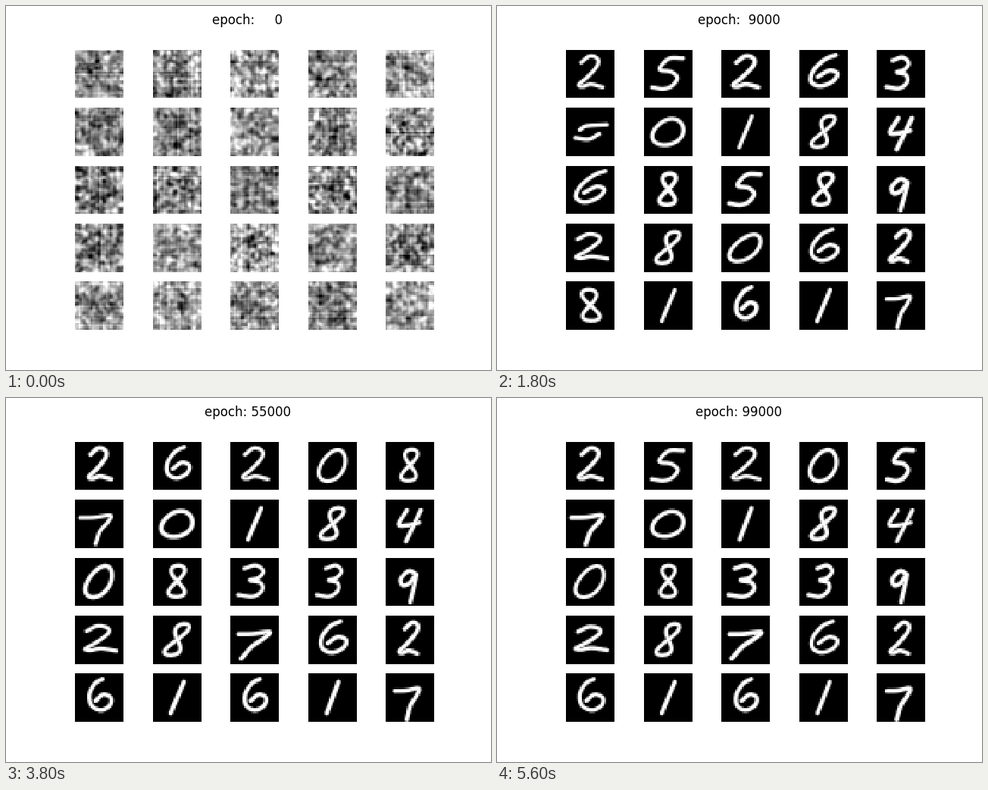
These frames come from a looping animation (640 by 480 pixels, 5.8 s). A matplotlib script:

```python
import numpy as np
import matplotlib.pyplot as plt
from matplotlib.animation import FuncAnimation

FRAMES, INTERVAL = 29, 200
KEYS = (5, 9, 13, 19, 23, 28)      # frames at which a cell reaches its next digit
SIDE, PIX, BOX = 64, 28, 41        # cell size, image pixels, longest side of a digit
SOFT = 2.3                         # width of a stroke's edge
GRID = (np.arange(PIX) + .5) * SIDE / PIX


def even(p, n=80):
    """Resample a polyline at equal steps of length."""
    s = np.r_[0, np.hypot(*np.diff(p, axis=0).T).cumsum()]
    t = np.linspace(0, s[-1], n)
    return np.column_stack([np.interp(t, s, p[:, 0]), np.interp(t, s, p[:, 1])])


def pen(*flat):
    """Catmull-Rom spline through x, y, x, y, ..."""
    p = np.reshape(flat, (-1, 2)).astype(float)
    q = np.vstack([2 * p[0] - p[1], p, 2 * p[-1] - p[-2]])
    t = np.linspace(0, len(p) - 1 - 1e-9, 200)
    i = t.astype(int)
    u = (t - i)[:, None]
    a, b, c, d = (q[i + k] for k in range(4))
    return even(b + .5 * u * (c - a + u * (2 * a - 5 * b + 4 * c - d
                                           + u * (3 * (b - c) + d - a))))


def loop(width, start, end, turns=1):
    """Oval (turns=1) or figure eight (turns=2), counter-clockwise from the top."""
    t = np.linspace(start, end, 200)
    y = 5 - 5 * np.cos(t)
    return even(np.column_stack([-width * np.sin(turns * t) * (.88 + .024 * y), y]))


# handwriting on a 10 x 10 field
SHAPES = {
    "0": [loop(3.7, 0, 6.4)],
    "c": [loop(4.2, -.7, 4.1)],
    "8": [loop(3, 0, 6.28, 2)],
    "1": [pen(0, 0, 0, 5, 0, 10)],
    "2": [pen(1, 2, 4, 0, 7, .8, 7.2, 3, 4, 6.5, 1, 9, 2.5, 9.6, 5.5, 8.9, 10, 9.8)],
    "3": [pen(1, 1, 5, 0, 8, 1.8, 6.5, 4, 3.5, 4.8, 7.5, 5.6, 8.5, 8, 5.5, 10, 0, 9.5)],
    "4": [pen(1.5, 0, 0, 4.5, 4, 4.8, 8.5, 4), pen(7.5, 0, 6.5, 5, 5.5, 10)],
    "5": [pen(9.5, .3, 5, .3, 2.5, 2.2, 2, 4, 6, 4.6, 8.5, 6.5, 7, 9, 4, 10, 0, 9.5)],
    "6": [pen(6.5, 0, 3.5, 1.5, 1, 5, 1.3, 8.5, 4.5, 10, 8, 8.5, 8.7, 6, 6, 5, 3, 7)],
    "7": [pen(0, 1, 4, .9, 8.5, .2, 8, 2.5, 6, 5.5, 5, 10)],
    "9": [pen(7.5, 1, 4, 0, .8, 2.5, 2, 4.6, 5, 3.8, 7.5, 1, 7, 5, 6, 10)],
    "=": [pen(1, 5, 3, 3.5, 9, 3), pen(0, 8, 4, 8.5, 7, 6.5)],
}

# digits shown in turn, lean, stretch
CELLS = [
    ("822222", .1, .8), ("655665", .1, .9), ("222222", .1, .9),
    ("660000", .3, 1.05), ("333855", .1, .75),
    ("==0777", .1, 1.2), ("00c000", .3, 1.6), ("111111", .4, 1),
    ("888888", .4, .75), ("944444", .35, .75),
    ("c60000", .4, 1.05), ("388888", .05, .8), ("553333", .15, .9),
    ("888333", .25, .75), ("799999", .1, .7),
    ("922222", .1, 1.4), ("888888", .45, .75), ("=0=777", .6, 1.3),
    ("666666", .1, 1), ("122222", .25, .65),
    ("080666", -.1, .9), ("111111", .4, 1), ("666606", 0, .85),
    ("111111", .4, 1), ("777777", .1, .85),
]


def pose(k, i):
    """Strokes and weight of a cell's i-th digit, centred on its mass."""
    rng = np.random.default_rng(50 * k + i)
    digits, lean, stretch = CELLS[k]
    lean += rng.uniform(-.04, .04)
    stretch *= rng.uniform(.95, 1.05)
    strokes = [np.column_stack([p[:, 0] * stretch + lean * (5 - p[:, 1]), p[:, 1]])
               for p in SHAPES[digits[i]]]
    ink = np.vstack(strokes)
    scale = BOX / np.ptp(ink, axis=0).max()
    return ([(p - ink.mean(axis=0)) * scale + SIDE / 2 for p in strokes],
            rng.uniform(5, 6.2))


def paint(strokes, weight, soft=SOFT):
    p = np.vstack(strokes)
    d2 = ((GRID[None, :, None] - p[:, 0]) ** 2
          + (GRID[:, None, None] - p[:, 1]) ** 2).min(axis=2)
    return np.clip((weight / 2 - np.sqrt(d2)) / soft + .5, 0, 1)


def wobble(strokes, rng, amp):
    s = np.linspace(0, 2 * np.pi, 80)[:, None]
    return [p + amp * np.sin(s + rng.uniform(0, 2 * np.pi, 2)) for p in strokes]


def digit(k, n):
    rng = np.random.default_rng(5000 + 25 * n + k)
    if n in KEYS:
        return paint(*pose(k, KEYS.index(n)))
    if n < KEYS[0]:                # blurred first attempts
        left = KEYS[0] - n
        strokes, weight = pose(k, 0)
        return paint(wobble(strokes, rng, .8 * left), weight, SOFT + left)
    i = int(np.searchsorted(KEYS, n))
    u = (n - KEYS[i - 1]) / (KEYS[i] - KEYS[i - 1])
    (old, w0), (new, w1) = pose(k, i - 1), pose(k, i)
    old, new = wobble(old, rng, .6), wobble(new, rng, .6)
    if CELLS[k][0][i - 1] == CELLS[k][0][i]:
        return paint([(1 - u) * p + u * q for p, q in zip(old, new)],
                     (1 - u) * w0 + u * w1)
    return (1 - u) * paint(old, w0) + u * paint(new, w1)


def smooth(a):
    for axis in (0, 1):
        a = (np.roll(a, 1, axis) + 2 * a + np.roll(a, -1, axis)) / 4
    return a


def noise(k):
    """Untrained output: noise at three scales with faint stripes."""
    rng = np.random.default_rng(900 + k)
    n = sum(gain * smooth(np.kron(rng.normal(size=(m, m)), np.ones((PIX // m,) * 2)))
            for m, gain in ((28, 1), (14, .8), (7, .45)))
    n = n + .2 * rng.normal(size=PIX) + .2 * rng.normal(size=(PIX, 1))
    v = rng.uniform(.45, .6) + rng.uniform(.16, .21) * (n - n.mean()) / n.std()
    r2 = (GRID - SIDE / 2) ** 2 + (GRID[:, None] - SIDE / 2) ** 2
    return np.clip(v + .1 - .16 * np.exp(-r2 / 500), 0, 1)


def epoch(n):
    return 1000 * n if n <= 10 else min(10000 + 5000 * (n - 10), 99000)


fig, axes = plt.subplots(5, 5, figsize=(6.4, 4.8), dpi=100)
fig.subplots_adjust(left=.125, right=.9, bottom=.11, top=.88, wspace=.2, hspace=.2)
title = fig.suptitle("", x=.5 - 1 / 640, fontsize=12, fontfamily="DejaVu Sans")
images = []
for ax in axes.flat:
    ax.axis("off")
    images.append(ax.imshow(np.zeros((PIX, PIX)), cmap="gray", vmin=0, vmax=1,
                            interpolation="nearest"))


def update(n):
    title.set_text(f"epoch: {epoch(n):5d}")
    for k, im in enumerate(images):
        im.set_data(digit(k, n) if n else noise(k))
    return [title, *images]


anim = FuncAnimation(fig, update, frames=FRAMES, interval=INTERVAL, repeat=True)
plt.show()
```
